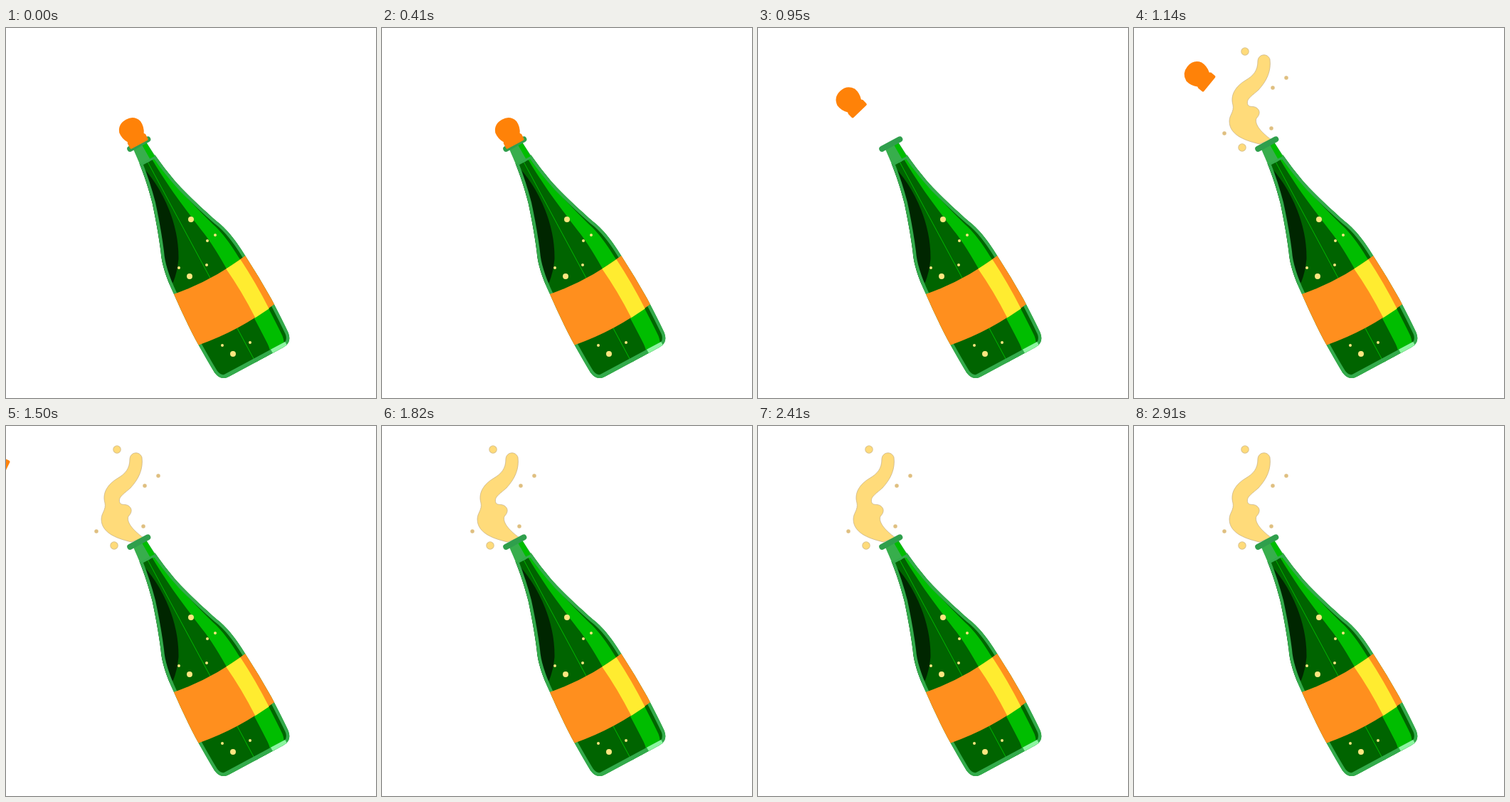
Write an HTML page that moves like this. It is 520x520 px and loops after 2960 ms.

```html
<!DOCTYPE html>
<html lang="en">
<head>
<meta charset="utf-8">
<title>Popping bottle</title>
<style>
  html, body { margin: 0; height: 100%; overflow: hidden; background: #fff; }
  svg { display: block; width: 100vw; height: 100vh; }
  .dots { stroke-linecap: round; }
</style>
</head>
<body>
<svg viewBox="0 0 520 520" fill="none">
  <defs>
    <!-- Right half of the bottle; the axis is x = 0 and the lip is y = 0 -->
    <path id="half" d="M-2 24 H12.5 C15 45 18 62 23 82 C30 106 38 130 45 148 Q55 170 57 209
      Q60 245 60.5 280 Q60 315 59 333 Q57 348 43 348 H-2"/>
    <g id="body"><use href="#half"/><use href="#half" transform="scale(-1 1)"/></g>
    <clipPath id="inside"><use href="#half"/><use href="#half" transform="scale(-1 1)"/></clipPath>
    <path id="trio" class="dots" stroke-width="4" d="M-15 -12 h0 M24 -16 h0"/>
  </defs>

  <g id="foam">
    <path fill="#ffdb7a" stroke="#c4ad82" stroke-opacity=".7" d="M176 163 C160 159 134 152 134 131
      C134 122 141 118 139 108 C135 94 143 82 156 74 C168 67 174 60 174 46 C175 36 188 35 191 44
      C193 60 187 74 175 87 C165 96 157 100 160 108 C163 112 167 109 172 112
      C178 116 177 122 172 127 C169 135 178 146 193 157 Z"/>
    <g class="dots">
      <path stroke="#d9c28c" stroke-width="11.5" d="M156 33 h0 M152 168 h0"/>
      <path stroke="#ffdb7a" stroke-width="9.5" d="M156 33 h0 M152 168 h0"/>
      <path stroke="#dfbf80" stroke-width="5.5" d="M214 70 h0 M195 84 h0 M193 141 h0 M127 148 h0"/>
    </g>
  </g>

  <g transform="translate(187 163) rotate(-28.3)">
    <g clip-path="url(#inside)">
      <use href="#body" fill="#006400"/>
      <use href="#half" transform="scale(.84 1)" fill="#00bd00"/>
      <use href="#half" transform="scale(.44 1)" fill="#006400"/>
      <path fill="#002600" d="M-13 24 C-1 62 -1 121 -28 169 Q-38 184 -50 194 H-65 V24 Z"/>
      <use href="#body" stroke="#33ab4b" stroke-width="9"/>
      <path stroke="#33ab4b" stroke-width="6" d="M-50 345 H50"/>
      <path stroke="#8cf5a0" stroke-width="6" d="M26 345 H49"/>
      <path fill="#ff8f1e" d="M-57 209 Q0 218 57 209 H65 V288.5 H60 Q0 298 -60 288.5 H-65 V209 Z"/>
      <path fill="#ffec30" d="M24.5 212.5 L48.5 210.5 Q52 250 51 290.5 L28 292.5 Q29 250 24.5 212.5 Z"/>
    </g>
    <path fill="#37ae4c" d="M-10.5 2 H10 L12 25.5 H-12.5 Z"/>
    <path fill="#00bd00" d="M3 3 H10 L11 25.5 H3.5 Z"/>
    <path class="dots" stroke="#2f9f4c" stroke-width="8" d="M-14.5 0 H14"/>
  </g>

  <g stroke="#ffe680">
    <path class="dots" stroke-width="8" d="M260 269 h0 M258 349 h0 M319 458 h0"/>
    <path class="dots" stroke-width="4" d="M283 299 h0 M294 291 h0"/>
    <use href="#trio" x="258" y="349"/>
    <use href="#trio" x="319" y="458"/>
  </g>

  <path id="cork" fill="#ff8208" d="M-12 1 Q-14 1 -14 -1 V-8 L-13 -10 Q-18 -18 -17 -27
    Q-13 -39 0 -39 Q13 -39 17 -27 Q18 -18 13 -10 L14.5 -8 V-1 Q14.5 1 12.5 1 Z"/>
</svg>
<script>
const LOOP = 2960, STEP = 1000 / 22, POP = 550, SPRAY = 1130;
const cork = document.getElementById('cork');
const foam = document.getElementById('foam');

function draw() {
  const t = Math.floor((performance.now() - start) % LOOP / STEP + 0.11) * STEP;
  const s = Math.max(0, t - POP);
  // The cork speeds up to the left while its climb levels off.
  const x = 0.045 * s + 1.61e-4 * s * s;
  const y = x * (0.933 + 0.003725 * x - 3.1e-5 * x * x);
  cork.setAttribute('transform', `translate(${187 - x} ${163 - y}) rotate(${-28.3 - 0.038 * s})`);
  foam.style.display = t > SPRAY ? '' : 'none';
  requestAnimationFrame(draw);
}
const start = performance.now();
draw();
</script>
</body>
</html>
```
